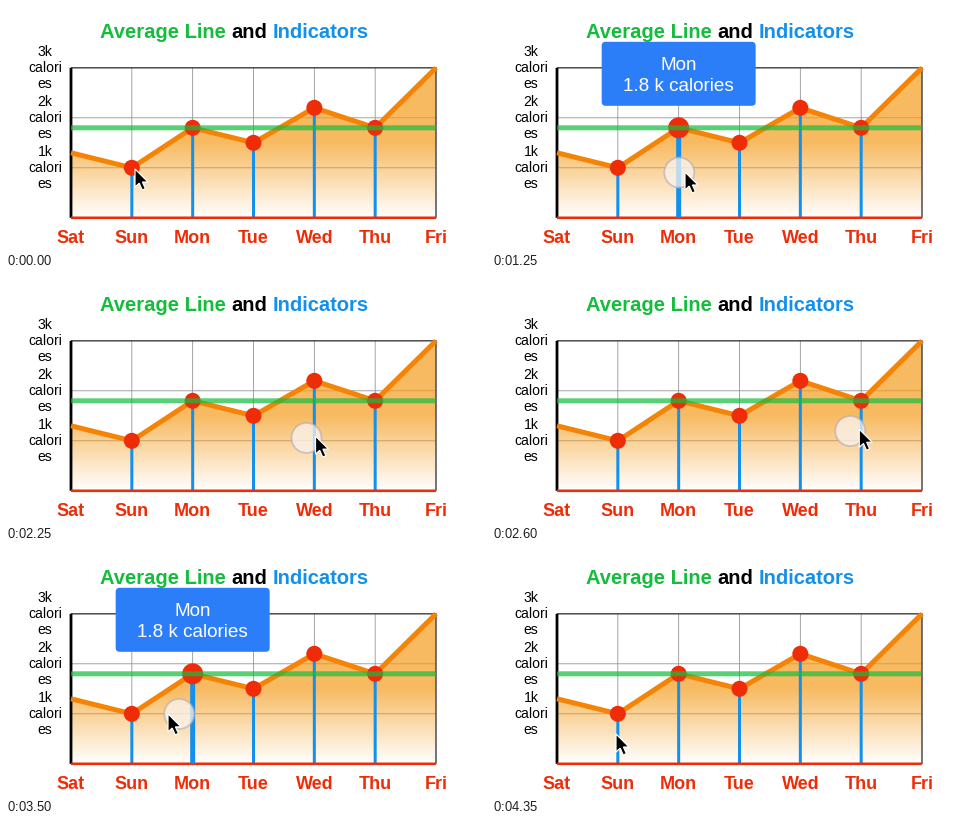
Animation of 480 by 245 pixels, one loop 4.4 s. Source, as a matplotlib script:

```python
import numpy as np
import matplotlib.pyplot as plt
from matplotlib.animation import FuncAnimation
from matplotlib.patches import Circle, FancyBboxPatch, Polygon

W, H, DPI = 480, 245, 100
STEP, FRAMES = 50, 88
PX = 72 / DPI

RED, BLUE, GREEN, ORANGE = "#ee2c08", "#1290ec", "#14bd3c", "#f58406"
GRID, FRAME = "#8f8f8f", "#4a4a4a"
DAYS = "Sat Sun Mon Tue Wed Thu Fri".split()
VALUES = np.array([1.3, 1.0, 1.8, 1.5, 2.2, 1.8, 3.0])
AVERAGE = 1.8

LEFT, RIGHT, BOTTOM, UNIT = 65, 430, 211.8, 50
TOP = BOTTOM - 3 * UNIT
XS = np.linspace(LEFT, RIGHT, len(DAYS))
YS = BOTTOM - UNIT * VALUES

# Pointer way points: time (ms), x, y
WAY = np.array([
    (600, 129, 163), (1250, 193, 166), (1950, 260, 163), (2665, 378, 149),
    (3000, 378, 150), (3300, 210, 159), (3650, 126, 164), (4350, 124, 182),
])
LAG = 50              # the touch ring trails the pointer, the tooltip trails the ring
PRESS, RELEASE, FADE = 50, 4050, 150
SNAP = 10             # reach of a data point in px

fig = plt.figure(figsize=(W / DPI, H / DPI), dpi=DPI, facecolor="white")
ax = fig.add_axes([0, 0, 1, 1])
ax.axis("off")


def text(x, y, s, size, color="black", weight="normal", ha="center", z=11):
    return ax.text(x, y, s, size=size * PX, color=color, weight=weight, ha=ha,
                   va="baseline", family="Liberation Sans", zorder=z)


def line(x, y, color, width, z, **kw):
    return ax.plot(x, y, color=color, lw=width * PX, zorder=z, snap=False,
                   solid_capstyle="butt", **kw)[0]


def dot(x, y, r, z):
    return ax.add_patch(Circle((x, y), r, fc=RED, ec="none", zorder=z))


def draw_area():
    fill = np.full((150, 1, 4), (0.96, 0.61, 0.1, 0.69))
    fill[:, 0, 3] *= np.clip(np.linspace(2, 0, 150), 0, 1)
    outline = [*zip(XS, YS), (RIGHT, BOTTOM), (LEFT, BOTTOM)]
    clip = ax.add_patch(Polygon(outline, fc="none", ec="none"))
    img = ax.imshow(fill, extent=(LEFT, RIGHT, BOTTOM, TOP), aspect="auto",
                    interpolation="bilinear", zorder=2)
    img.set_clip_path(clip)


def draw_chart():
    for x in XS[1:-1]:
        line([x, x], [TOP, BOTTOM], GRID, 0.8, 1)
    for k in (1, 2):
        line([LEFT, RIGHT], [BOTTOM - k * UNIT] * 2, GRID, 0.8, 1)
    draw_area()
    line([LEFT, RIGHT, RIGHT], [TOP, TOP, BOTTOM], FRAME, 1.5, 3)
    line([LEFT, LEFT], [TOP, BOTTOM], "black", 2.8, 3)
    line([LEFT, RIGHT], [BOTTOM, BOTTOM], RED, 2.6, 7)
    line(XS, YS, ORANGE, 5, 5, solid_joinstyle="round")
    for x, y in zip(XS[1:-1], YS[1:-1]):
        line([x, x], [y, BOTTOM], BLUE, 3, 4)
        dot(x, y, 8, 6)
    line([LEFT, RIGHT], [BOTTOM - AVERAGE * UNIT] * 2, GREEN, 5, 10, alpha=0.7)


def draw_labels():
    for x, s, color in ((93.5, "Average Line", GREEN), (225, "and", "black"),
                        (266.5, "Indicators", BLUE)):
        text(x, 32.3, s, 20.2, color, "bold", "left")
    for k in (1, 2, 3):
        for row, s in enumerate((f"{k}k", "calori", "es")):
            text(39, 200 - UNIT * k + 16.2 * row, s, 14)
    for x, day in zip(XS, DAYS):
        text(x, 237, day, 18, RED, "bold")


draw_chart()
draw_labels()
ax.set(xlim=(0, W), ylim=(H, 0))

stem = line([], [], BLUE, 5, 8)
spot = dot(0, 0, 10.5, 9)
box = ax.add_patch(FancyBboxPatch(
    (0, 0), 146, 56, boxstyle="round,pad=4,rounding_size=4",
    fc="#2c7df8", ec="none", zorder=12))
name, amount = (text(0, 0, "", 18.9, "white", z=13) for _ in range(2))
tip = (stem, spot, box, name, amount)

touch = ax.add_patch(Circle((0, 0), 15, lw=1.8 * PX, zorder=14))
ARROW = np.array([(0, 0), (0, 18), (4.2, 14.2), (7.2, 21), (10.4, 19.6),
                  (7.4, 13), (13, 13)])
cursor = ax.add_patch(Polygon(ARROW, fc="black", ec="white", lw=1.2 * PX,
                              zorder=15))


def pointer(t):
    return np.array([np.interp(t, WAY[:, 0], axis) for axis in WAY[:, 1:].T])


def active_spot(t):
    """Index of the data point under the touch, or None."""
    gap = np.abs(XS - pointer(t - 2 * LAG)[0])
    i = gap.argmin()
    return i if PRESS < t < RELEASE and gap[i] <= SNAP else None


def show_tip(i):
    for part in tip:
        part.set_visible(i is not None)
    if i is None:
        return
    x, y = XS[i], YS[i]
    stem.set_data([x, x], [y, BOTTOM])
    spot.center = x, y
    box.set(x=x - 73, y=y - 82)
    name.set(position=(x, y - 57.8), text=DAYS[i])
    amount.set(position=(x, y - 36.8), text=f"{VALUES[i]:.1f} k calories")


def show_touch(t):
    level = np.clip(min(t / 200, (RELEASE - t) / FADE + 1), 0, 1)
    touch.center = pointer(t - LAG) + (-0.8, 0.8)
    touch.set(radius=9 + 6 * level,
              facecolor=(0.98, 0.96, 0.95, 0.74 * level),
              edgecolor=(0.72, 0.67, 0.7, 0.65 * level))


def update(frame):
    t = frame * STEP
    cursor.set_xy(ARROW + pointer(t))
    show_tip(active_spot(t))
    show_touch(t)
    return (*tip, touch, cursor)


anim = FuncAnimation(fig, update, frames=FRAMES, interval=STEP, repeat=True,
                     repeat_delay=0, blit=False)
plt.show()
```
